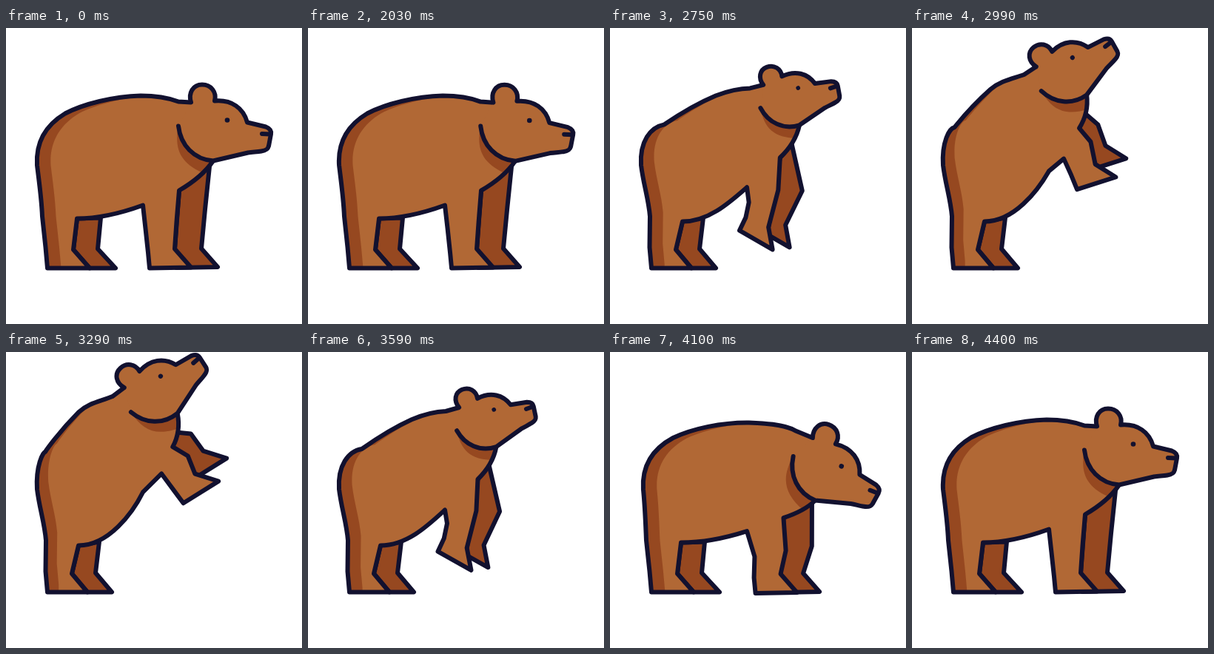
An HTML page that plays this animation: 400x400 px, repeating every 4430 ms.

```html
<!DOCTYPE html>
<html lang="en">
<head>
<meta charset="utf-8">
<title>Bear</title>
<style>
html, body { margin: 0; width: 100%; height: 100%; overflow: hidden; background: #fff; }
svg { display: block; width: 100%; height: 100%; }
.line { stroke: #12112f; stroke-width: 6; stroke-linecap: round; stroke-linejoin: round; }
.light { fill: #b16835; }
.dark { fill: #964820; }
</style>
</head>
<body>
<svg viewBox="0 -0.5 400 400">
  <clipPath id="clip"><path id="clipBody"/></clipPath>
  <path id="farHind" class="dark line"/>
  <path id="farFront" class="dark line"/>
  <path id="body" class="dark"/>
  <g clip-path="url(#clip)">
    <path id="lit" class="light"/>
    <path id="chin" class="dark" d="M233 132C227 163 235 183 270 197L292 206L280 179Z"/>
  </g>
  <path id="outline" class="line" fill="none"/>
  <g id="head" class="line">
    <path class="light" d="M233 132C236 158 254 177 280 179L327 168C335 167 340 167 345 166C352 165 354 163 355 159L358 143C359 138 356 135 351 133L326 127C321 108 305 96 282 98C285 86 277 76 265 76C253 76 246 87 250 100"/>
    <path d="M346 142.500L357 143" fill="none"/>
    <circle cx="299" cy="124" r="3.300" fill="#12112f" stroke="none"/>
  </g>
</svg>
<script>
const LOOP = 4430;
const EYE = [299, 124], SPINE = [139, 191], NECK = [222, 168];
const $ = id => document.getElementById(id);
const clamp = v => Math.min(1, Math.max(0, v));
const smooth = v => clamp(v) ** 2 * (3 - 2 * clamp(v));

// turn, nod, reach, girth, shift, paw angle, then knee and ankle of the near and far front leg
const stand = [0, 0, 1, 1, 0, 0, 209.5, 266, 210, 300, 248, 249, 246, 299.5];
const crouch = [3, 22, 1, 0.97, 4, 0, 219, 274, 213.5, 302, 253, 272, 242, 301];
const rise = [-21, 0, 0.92, 0.92, 0, 31, 207.5, 227, 199, 262, 240, 228, 222, 259];
const rear = [-43.5, 0, 1, 1.08, 0, -31, 228, 152, 241, 175, 232, 122, 252, 144];
const land = stand.map((v, i) => (v + crouch[i]) / 2);

const keys = [
  [2000, stand], [2490, crouch], [2750, rise], [3100, rear], [3290, rear],
  [3610, rise], [3830, land], [3950, crouch], [4400, stand]
];

// Monotone slope at key k, zero at turning points
function slope(k, val) {
  if (k === 0 || k === keys.length - 1) return 0;
  const a = (val(k) - val(k - 1)) / (keys[k][0] - keys[k - 1][0]);
  const b = (val(k + 1) - val(k)) / (keys[k + 1][0] - keys[k][0]);
  return a * b <= 0 ? 0 : 2 * a * b / (a + b);
}

function poseAt(t) {
  if (t <= keys[0][0] || t >= keys[keys.length - 1][0]) return stand;
  let k = 0;
  while (t >= keys[k + 1][0]) k++;
  const span = keys[k + 1][0] - keys[k][0];
  const u = (t - keys[k][0]) / span, v = 1 - u;
  return stand.map((_, i) => {
    const val = n => keys[n][1][i];
    return val(k) * v * v * (1 + 2 * u) + val(k + 1) * u * u * (3 - 2 * u)
      + span * u * v * (v * slope(k, val) - u * slope(k + 1, val));
  });
}

// Place the offset (x, y), turned and scaled, at a centre
function spin([cx, cy], x, y, deg, size = 1) {
  const a = deg * Math.PI / 180, c = Math.cos(a) * size, s = Math.sin(a) * size;
  return [cx + x * c - y * s, cy + x * s + y * c];
}

function draw(t) {
  const [turn, nod, reach, girth, shift, paw, kx, ky, ax, ay, fkx, fky, fax, fay] = poseAt(t);
  const lean = clamp(-turn / 20);

  // The trunk bends around the spine, fully in front and not at all at the hind legs
  const bend = (x, y, size = girth) => {
    const w = smooth((x - 0.35 * (y - 115) - 30) / 110);
    const [px, py] = spin(SPINE, x - SPINE[0], y - SPINE[1], turn * w,
      1 + (size - 1) * Math.min(1, 2 * w));
    return [px + shift * clamp((324 - y) / 140), py];
  };
  const neck = bend(...NECK, reach);
  const nodded = (x, y, part) => {
    const [px, py] = bend(x, y, reach);
    return spin(neck, px - neck[0], py - neck[1], nod * part);
  };

  const eye = nodded(...EYE, 1), tilt = turn + nod, size = reach - 0.055 * lean;
  const onHead = (x, y) => spin(eye, x - EYE[0], y - EYE[1], tilt, size);
  const jaw = onHead(280, 179);

  const back = `M${onHead(250, 100)}L${nodded(233, 99, 0.6)}`
    + `C${nodded(217, 93, 0.6)},${bend(199, 91)},${bend(182, 91)}`
    + `C${bend(145, 92)},${bend(105, 102)},${bend(80, 115)}`
    + `C${bend(55, 130)},${bend(40, 153)},${bend(42, 185)}`
    + `C${bend(45, 210)},${48 + 4 * lean},230,${49 + 5 * lean},254L53.5,296L56,324`;

  // Belly and chest rise with the turn
  const toe = 113 - 3 * lean, shin = 91 - 2 * lean;
  const groin = [96 + 2 * lean, 257 + 4 * lean];
  const belly = [185, 239 + 1.15 * turn];
  const chest = [234 + 0.2 * turn, 219 + 2.1 * turn];
  const bust = [(chest[0] + jaw[0]) / 2 + 8, (chest[1] + jaw[1]) / 2 + 2];

  const knee = (x, y, side) => spin([x, y], 21 * side, -4.5 * side, turn / 2);
  const foot = (x, y) => [[-18, 3], [-16, 24], [40, 23], [18, -2]]
    .map(([dx, dy]) => spin([x, y], dx, dy, paw, reach));
  const near = foot(ax, ay), far = foot(fax, fay);

  const d = `${back}L${toe},324L${shin},299L${groin}`
    + `C${groin[0] + 30 - turn / 4},${groin[1]},${spin(belly, -31, 0, turn - 20)},${belly}`
    + `L${knee(kx, ky, -1)}L${near.join('L')}L${knee(kx, ky, 1)}L${chest}Q${bust},${jaw}`;
  for (const id of ['body', 'outline', 'clipBody']) $(id).setAttribute('d', d);

  // The lit side is the back edge slid along its own slope
  $('lit').setAttribute('d', `${back}L56,340L400,340L400,0Z`);
  $('lit').setAttribute('transform', `translate(${spin([0, 0], 18.5, 0, turn * 0.8)})`);

  $('farHind').setAttribute('d',
    `M${128 - 2 * lean},256L${124 - 3 * lean},298L${148 - 5 * lean},324`
    + `L${toe},324L${shin},299L${groin}Z`);

  const q = 0.85 - 0.4 * lean;
  const top = jaw.map((v, i) =>
    (1 - q) ** 2 * chest[i] + 2 * q * (1 - q) * bust[i] + q * q * v);
  $('farFront').setAttribute('d',
    `M${top}L${knee(fkx, fky, 1)}L${far[3]}L${far[2]}L${far[1]}L${near[3]}L${chest}Z`);

  const move = `translate(${eye}) rotate(${tilt}) scale(${size}) translate(${-EYE[0]} ${-EYE[1]})`;
  $('head').setAttribute('transform', move);
  $('head').style.strokeWidth = 6 / size;
  $('chin').setAttribute('transform', move);
}

const start = performance.now();
function tick(now) {
  draw(Math.max(0, now - start) % LOOP);
  requestAnimationFrame(tick);
}
draw(0);
requestAnimationFrame(tick);
</script>
</body>
</html>
```
